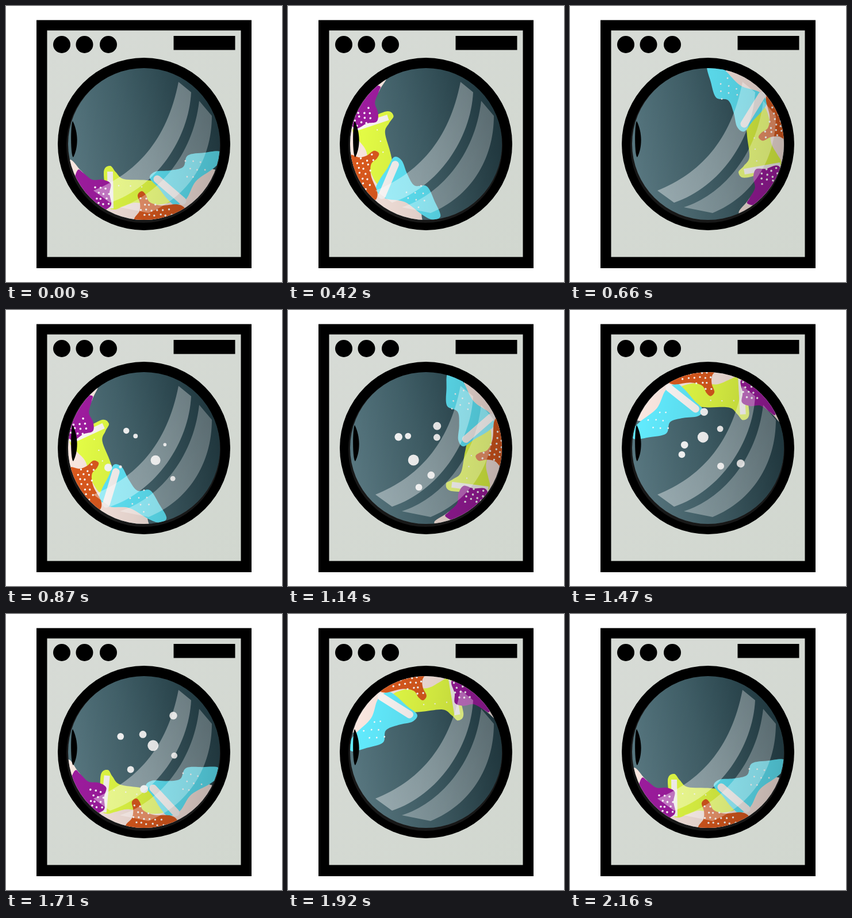
These frames come from a looping animation (480x480 px, 2.25 s). An HTML page with a canvas:

```html
<!DOCTYPE html>
<html lang="en">
<head>
<meta charset="utf-8">
<title>Washing machine</title>
<style>
html, body { margin: 0; width: 100%; height: 100%; overflow: hidden; background: #fff; }
canvas { display: block; width: 100vw; height: 100vh; object-fit: contain; }
</style>
</head>
<body>
<canvas id="stage" width="480" height="480"></canvas>
<script>
const ctx = document.getElementById('stage').getContext('2d');
const TAU = Math.PI * 2;
const LOOP = 2250, STEP = 30, TURNS = 4;
const SPIN = { from: 328, to: 2160 };
const FOAM = { from: 735, to: 1935, grow: 120 };
const DRUM = { x: 240, y: 240, r: 132 };
const AXIS = { x: 242, y: 236 };

function seeded(seed) {
  return () => (seed = seed * 16807 % 2147483647) / 2147483647;
}

const clamp = v => Math.min(1, Math.max(0, v));

// Smooth closed curve through a few points.
function blob(text) {
  const pts = text.split(' ').map(p => p.split(',').map(Number));
  const n = pts.length, path = new Path2D();
  path.moveTo(...pts[0]);
  for (let i = 0; i < n; i++) {
    const [a, b, c, d] = [n - 1, 0, 1, 2].map(k => pts[(i + k) % n]);
    path.bezierCurveTo(
      b[0] + (c[0] - a[0]) / 6, b[1] + (c[1] - a[1]) / 6,
      c[0] - (d[0] - b[0]) / 6, c[1] - (d[1] - b[1]) / 6, ...c);
  }
  return path;
}

// Staggered dots that fall inside a shape within a box.
function speckles(path, x, y, w, h, gap) {
  const rand = seeded(77), list = [];
  for (let row = 0; row * gap <= h; row++) {
    for (let col = 0; col * gap <= w; col++) {
      const px = x + (col + row % 2 / 2) * gap + rand() * 3;
      const py = y + row * gap + rand() * 3;
      if (ctx.isPointInPath(path, px, py)) list.push([px, py]);
    }
  }
  return list;
}

const pink = blob('110,268 130,286 150,305 190,328 240,335 290,330 320,308 345,287 361,284 385,300 330,380 240,395 150,380 100,310');
const yellow = blob('170,290 181,278 191,289 205,301 245,303 290,310 290,338 258,346 225,342 203,349 188,354 178,345');
const purple = blob('125,285 134,290 150,302 168,302 182,309 180,326 183,345 174,354 150,368 112,345 118,305');
const cyan = blob('250,299 260,288 285,286 308,280 316,260 345,255 372,253 374,268 360,283 330,305 314,335 295,346 281,336 265,316');
const orange = blob('229,329 236,322 243,328 250,341 270,347 298,345 311,352 305,363 290,385 225,385 223,370 232,357 233,343');

const purpleDots = speckles(purple, 155, 315, 24, 30, 9);
const orangeDots = speckles(orange, 234, 334, 50, 34, 9.5);
const cyanDots = speckles(cyan, 312, 269, 34, 30, 13);
const yellowDots = speckles(yellow, 196, 312, 40, 6, 20);

const glareA = new Path2D('M300 132L322 150C318 230 262 315 181 342L152 321C225 292 280 235 300 132Z');
const glareB = new Path2D('M336 165L358 191C358 267 317 332 248 360L198 350C262 330 325 262 336 165Z');
const handle = new Path2D('M116 200C126 220 126 246 117 263C112 262 112 205 116 200Z');

const rand = seeded(4242);
const bubbles = Array.from({ length: 7 }, (_, i) => ({
  r: i ? 4.5 + rand() * 2.5 : 9.5,
  reach: 25 + i * 7,
  phase: i * TAU * 0.38 + rand(),
  speed: 1.5 + rand() * 2,
  delay: rand() * 100
}));

function gradient(x0, y0, x1, y1, ...stops) {
  const g = ctx.createLinearGradient(x0, y0, x1, y1);
  stops.forEach((c, i) => g.addColorStop(i / (stops.length - 1), c));
  return g;
}

const body = gradient(71, 42, 409, 437, '#d7dbd6', '#d1d7cf');
const back = gradient(110, 290, 362, 195, '#5a7982', '#44646d', '#294750');
const shade = gradient(108, 220, 372, 260, 'rgba(0,0,0,0)', 'rgba(0,0,0,.1)', 'rgba(0,0,0,.25)');
const shine = gradient(330, 140, 170, 340, 'rgba(255,255,255,.32)', 'rgba(255,255,255,.4)');

function disc(x, y, r, color) {
  ctx.fillStyle = color;
  ctx.beginPath();
  ctx.arc(x, y, r, 0, TAU);
  ctx.fill();
}

function box(x, y, w, h, color) {
  ctx.fillStyle = color;
  ctx.fillRect(x, y, w, h);
}

function cloth(path, color, dots = [], size = 1.5) {
  ctx.fillStyle = color;
  ctx.fill(path);
  for (const [x, y] of dots) disc(x, y, size, '#fff');
}

function stripe(x0, y0, x1, y1, width, cap) {
  ctx.strokeStyle = '#fdf8f6';
  ctx.lineWidth = width;
  ctx.lineCap = cap;
  ctx.beginPath();
  ctx.moveTo(x0, y0);
  ctx.lineTo(x1, y1);
  ctx.stroke();
}

function machine() {
  box(0, 0, 480, 480, '#fff');
  box(53, 24.5, 374, 431.5, '#000');
  box(71.5, 42.5, 337, 394, body);
  for (const x of [97, 136.5, 178]) disc(x, 67, 15, '#000');
  box(291.5, 52, 107, 24.5, '#000');
  disc(DRUM.x, DRUM.y, 150, '#000');
  disc(DRUM.x - 1, DRUM.y + 3, 134, '#181818');
  disc(DRUM.x, DRUM.y, DRUM.r, back);
}

function laundry(angle) {
  ctx.save();
  ctx.translate(AXIS.x, AXIS.y);
  ctx.rotate(angle);
  ctx.translate(-AXIS.x, -AXIS.y);
  cloth(pink, '#fbe8e1');
  cloth(yellow, '#e6ff46', yellowDots, 1.2);
  stripe(181, 288, 182, 352, 10, 'butt');
  cloth(purple, '#9e1c9f', purpleDots, 1.8);
  cloth(cyan, '#62ecff', cyanDots, 1.4);
  stripe(263, 301, 307, 339, 13, 'round');
  cloth(orange, '#dc5a1e', orangeDots, 1.7);
  ctx.restore();
}

function foam(t) {
  const k = (t - FOAM.from) / (FOAM.to - FOAM.from);
  for (const b of bubbles) {
    const size = clamp((t - FOAM.from - b.delay) / FOAM.grow) * clamp((FOAM.to - b.delay - t) / FOAM.grow);
    const a = b.phase + b.speed * k * 2;
    const drift = b.reach * (1 + 0.25 * Math.sin(k * TAU + b.phase));
    if (size > 0) disc(DRUM.x + drift * Math.cos(a), DRUM.y + drift * Math.sin(a), b.r * size, '#fff');
  }
}

function glass() {
  disc(DRUM.x, DRUM.y, DRUM.r, shade);
  ctx.fillStyle = shine;
  ctx.fill(glareA);
  ctx.globalAlpha = 0.8;
  ctx.fill(glareB);
  ctx.globalAlpha = 1;
  ctx.fillStyle = '#000';
  ctx.fill(handle);
}

function draw(time) {
  const t = Math.floor((time % LOOP) / STEP) * STEP;
  const turn = clamp((t - SPIN.from) / (SPIN.to - SPIN.from)) * TURNS;
  machine();
  ctx.save();
  ctx.beginPath();
  ctx.arc(DRUM.x, DRUM.y, DRUM.r, 0, TAU);
  ctx.clip();
  // The spin starts with the first whole step after rest.
  laundry(t < SPIN.from + STEP ? 0 : turn * TAU);
  foam(t);
  glass();
  ctx.restore();
}

let begin = null;
function tick(now) {
  if (begin === null) begin = now;
  draw(now - begin);
  requestAnimationFrame(tick);
}
draw(0);
requestAnimationFrame(tick);
</script>
</body>
</html>
```
